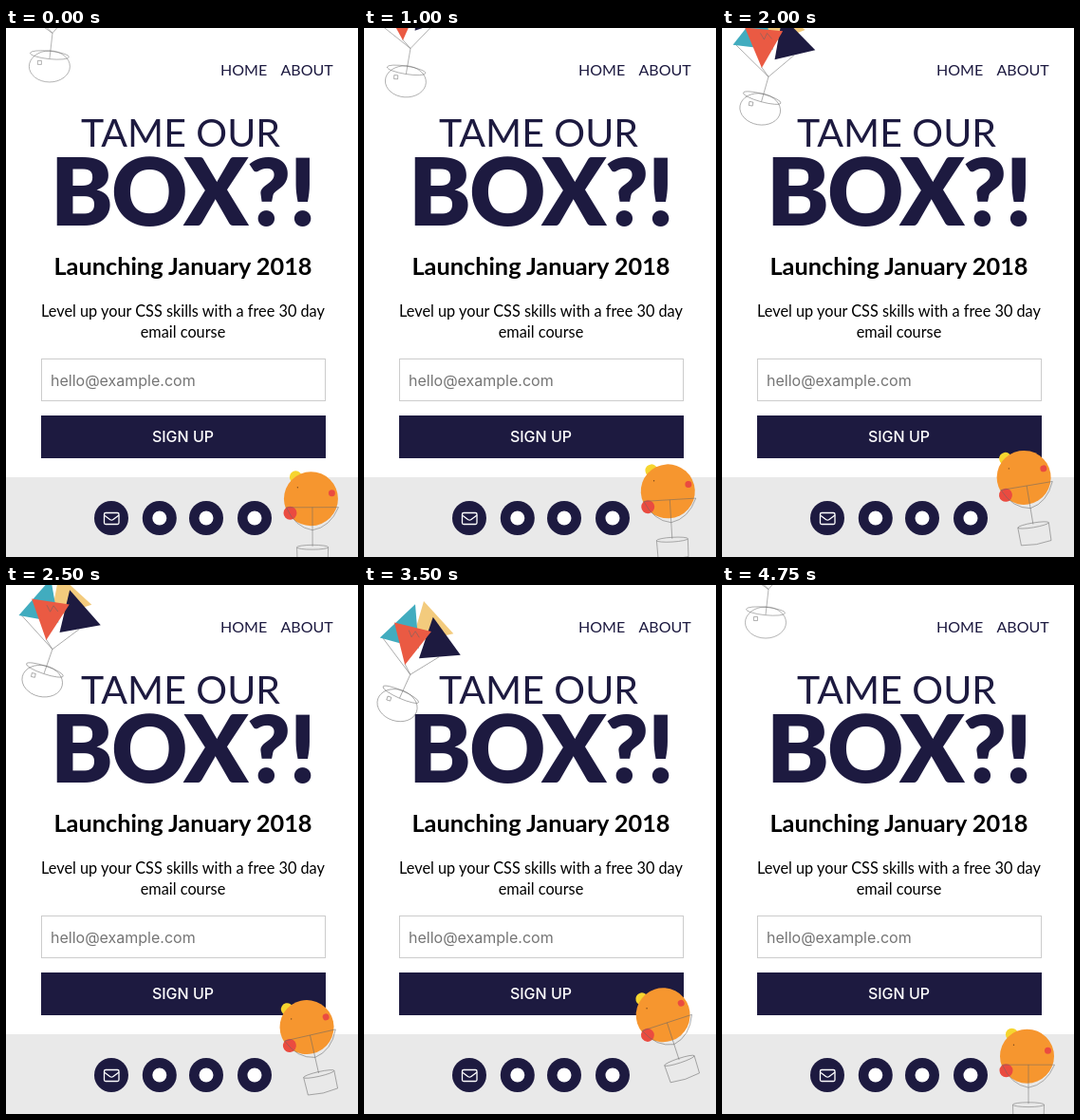
Write an HTML page with a canvas that moves like this. It is 371 px wide and 557 px high and loops after 5 s.

```html
<!DOCTYPE html>
<html lang="en">
<head>
<meta charset="utf-8">
<title>Launch page</title>
<style>
  html, body { margin: 0; width: 100%; height: 100%; overflow: hidden; background: #fff; }
  svg, canvas { position: absolute; left: 0; top: 0; width: 371px; height: 557px; }
  text { font-family: Lato, "Open Sans", sans-serif; }
  .navy { fill: #1d1a40; }
  .mid { text-anchor: middle; }
  .ui { font-family: Inter, Roboto, sans-serif; font-size: 16px; }
</style>
</head>
<body>
<svg viewBox="0 0 371 557">
  <g class="navy" font-size="16">
    <text x="226" y="50">HOME</text>
    <text x="289.5" y="50">ABOUT</text>
  </g>
  <g class="navy mid">
    <text x="184" y="125" font-size="41">TAME OUR</text>
    <text x="186" y="208" font-size="99" font-weight="900" letter-spacing="-2">BOX?!</text>
  </g>
  <g class="mid">
    <text x="186.5" y="259.5" font-size="25.3" font-weight="700">Launching January 2018</text>
    <text x="186.5" y="304" font-size="16.3">Level up your CSS skills with a free 30 day</text>
    <text x="186.5" y="326" font-size="16.3">email course</text>
  </g>
  <rect x="37.5" y="348.5" width="299" height="44" fill="#fff" stroke="#ccc"/>
  <text class="ui" x="47" y="377" fill="#757575">hello@example.com</text>
  <rect class="navy" x="37" y="408" width="300" height="45"/>
  <text class="ui mid" x="186.5" y="436" fill="#fff" font-weight="500">SIGN UP</text>
  <rect y="473" width="371" height="84" fill="#e9e9e9"/>
  <g class="navy">
    <circle cx="111" cy="516" r="18"/>
    <circle cx="161.8" cy="516" r="18"/>
    <circle cx="211" cy="516" r="18"/>
    <circle cx="262" cy="516" r="18"/>
  </g>
  <g fill="none" stroke="#fff" stroke-width="1.3" stroke-linejoin="round">
    <rect x="103.5" y="510.5" width="15.5" height="12" rx="1.5"/>
    <path d="M103.5 513L109.5 517.5Q111.25 518.8 113 517.5L119 513"/>
  </g>
  <g fill="#fff">
    <circle cx="161.8" cy="516" r="7.5"/>
    <circle cx="211" cy="516" r="7.5"/>
    <circle cx="262" cy="516" r="7.5"/>
  </g>
</svg>
<canvas></canvas>
<script>
const W = 371, H = 557, LOOP = 5000, STEP = 250, RISE = 4750;
const TILT = 20 * Math.PI / 180;
const canvas = document.querySelector('canvas');
const ctx = canvas.getContext('2d');
const ratio = window.devicePixelRatio || 1;
canvas.width = W * ratio;
canvas.height = H * ratio;

function trace(pts) {
  ctx.beginPath();
  for (const [x, y] of pts) ctx.lineTo(x, y);
}

function poly(color, ...pts) {
  ctx.fillStyle = color;
  trace(pts);
  ctx.fill();
}

function line(...pts) {
  trace(pts);
  ctx.stroke();
}

function disc(color, x, y, r) {
  ctx.fillStyle = color;
  ctx.beginPath();
  ctx.arc(x, y, r, 0, 7);
  ctx.fill();
}

function oval(x, y, rx, ry, turn = 0) {
  ctx.beginPath();
  ctx.ellipse(x, y, rx, ry, turn, 0, Math.PI * 2);
  ctx.stroke();
}

function place(x, y, angle, draw) {
  ctx.save();
  ctx.translate(x, y);
  ctx.rotate(angle);
  draw();
  ctx.restore();
}

// Origin: centre of the basket rim
function kite() {
  const knot = [3, -23];
  for (const end of [[-6, -32], [26, -50], [-37, -51]]) line(knot, end);
  poly('#f3cb7d', [-7.5, -101], [33, -78], [-6, -55]);
  poly('#41acbf', [-39.5, -50], [-15, -95], [3, -52]);
  poly('#1d1a40', [7, -88], [47, -59], [6.5, -42]);
  poly('#ea5a43', [-30, -70], [10, -73], [-5.5, -31]);
  line([-13, -67], [-8, -61], [-6, -68], [0, -63]);
  line(knot, [0, 4]);
  oval(0, 0, 20.5, 4.2, 0.1);
  oval(0, 12, 21.5, 16.5);
  ctx.strokeRect(-12.5, 6, 4, 4);
}

// Origin: centre of the orange disc
function balloon() {
  disc('#f6d52f', -16, -23, 6.5);
  disc('#f6962f', 0, 0, 28.5);
  disc('#ea4b40', -22, 15, 7);
  disc('#ea4b40', 22, -6, 3.5);
  disc('#7a4a20', -14, -12, 0.7);
  line([-26, 9], [29, 9]);
  ctx.beginPath();
  ctx.moveTo(-26, 9);
  ctx.quadraticCurveTo(-17, 30, 1.5, 33);
  ctx.quadraticCurveTo(20, 30, 29, 9);
  ctx.stroke();
  line([1.5, 9], [1.5, 50]);
  oval(1.5, 51, 16.5, 2.4);
  ctx.beginPath();
  ctx.moveTo(-15, 51);
  ctx.lineTo(-14.5, 70);
  ctx.quadraticCurveTo(1.5, 73, 17.5, 70);
  ctx.lineTo(18, 51);
  ctx.stroke();
}

function frame(now) {
  const t = Math.floor(now % LOOP / STEP) * STEP;
  const x = ((t + STEP) % LOOP + 50) / RISE;
  const p = (1 - Math.cos(Math.PI * x)) / 2;
  ctx.setTransform(ratio, 0, 0, ratio, 0, 0);
  ctx.clearRect(0, 0, W, H);
  ctx.strokeStyle = '#666';
  ctx.lineWidth = 0.5;
  place(46 - 8 * p, 27.5 + 97 * p, TILT * p, kite);
  place(321.5 - 7 * p, 496.2 - 48 * p, -TILT * p, balloon);
  requestAnimationFrame(frame);
}
frame(performance.now());
</script>
</body>
</html>
```
